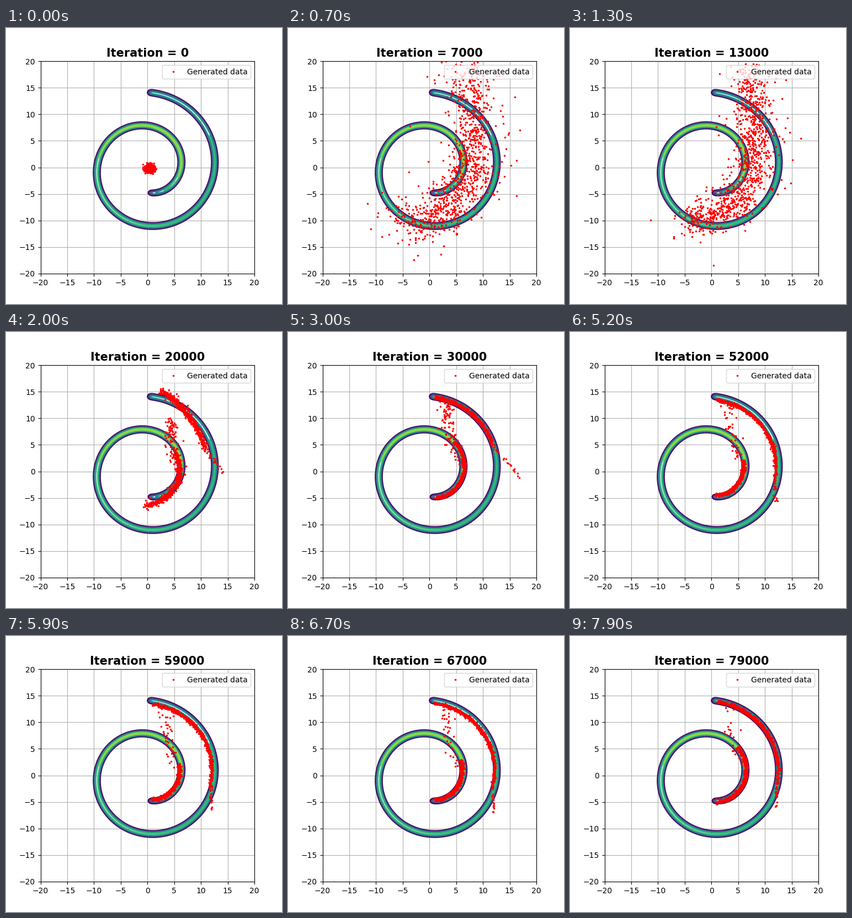
A matplotlib script for the animation above (8000 ms loop, 500 by 500 pixels).

```python
import numpy as np
import matplotlib.pyplot as plt
from matplotlib.animation import FuncAnimation

FRAMES, STEP_MS = 80, 100
N = 1000
PI = np.pi
START = np.array([.4, -.2])
CLOUD = [(6.8, 18.5), (8.3, 8), (8, -1), (3.5, -8), (-5, -10.5)]


def spiral(t, off=0):
    return np.column_stack([(t + off) * np.cos(t), (t + off) * np.sin(t)])


def along(nodes, u):
    """Points at fractions u of a polyline with evenly spaced nodes."""
    x, y = np.transpose(nodes)
    s = np.linspace(0, 1, len(nodes))
    return np.column_stack([np.interp(u, s, x), np.interp(u, s, y)])


def smooth(a, b, x):
    u = np.clip((x - a) / (b - a), 0, 1)
    return u * u * (3 - 2 * u)


def arc(rng, n, lo, hi, off, sd):
    t = PI * (lo + (hi - lo) * np.sort(rng.beta(1.3, 1.15, n))[::-1])
    return spiral(t, off + rng.normal(0, sd, n))


def path(rng, n, nodes, sd):
    return along(nodes, np.sort(rng.random(n)) ** 1.2) + rng.normal(0, sd, (n, 2))


def learned(k, rng):
    """Samples on the two arcs, the bridge between them and the outer tail."""
    age = max(k - 30, 0)
    sway = np.sin(PI * age / 50)
    n_bridge, n_tail = int(105 * np.exp(-age / 33)), 20
    n_in = (N - n_bridge - n_tail) // 2
    n_out = N - n_bridge - n_tail - n_in

    lo = 3.95 + .17 * np.exp(-age / 8)
    off = -.1 - .5 * sway
    tail_from = spiral(np.array([PI * lo]), off)[0]
    tail_to = (12 + 4.8 * np.exp(-age / 4), -7 + 6 * np.exp(-age / 10))
    return np.vstack([
        arc(rng, n_out, lo, 4.48, off, .16),
        path(rng, n_tail, [tail_from, tail_to], .15),
        path(rng, n_bridge, [(3.2, 13), (3.5, 8), (5, 2)], .65),
        arc(rng, n_in, 1.55, 2.28 - .17 * sway, .12 - .5 * sway, .17),
    ])


def samples(k):
    rng = np.random.default_rng(500 + k)
    blob = START + rng.normal(0, .4, (N, 2)) * (1, .85)
    u = np.sort(rng.random(N))
    spread = 2 * k / 7 * np.exp(1 - k / 7)
    cloud = along(CLOUD, u) + spread * rng.standard_t(6, (N, 2))
    grow, settle = smooth(0, 6, k), smooth(12, 24, k)
    pts = (1 - grow) * blob + grow * cloud
    return (1 - settle) * pts + settle * learned(k, rng)


def density(axis, sigma=.33):
    """Gaussian ridge along the spiral, in contour-level units."""
    t = np.linspace(1.5 * PI + .07, 4.5 * PI - .023, 1500)
    height = 6 + .265 * (9.27 - t) - 4.3 * np.exp(-(t - t[0]) / .75)
    ds = np.sqrt(1 + t ** 2) * (t[1] - t[0])
    gx, gy = (np.exp(-(axis[:, None] - c) ** 2 / (2 * sigma ** 2)) for c in spiral(t).T)
    return (gy * height * ds) @ gx.T / (np.sqrt(2 * PI) * sigma)


fig, ax = plt.subplots(figsize=(5, 5), dpi=100)
grid = np.linspace(-20, 20, 500)
ax.contour(grid, grid, density(grid), levels=np.arange(1, 7), cmap="viridis",
           vmin=1, vmax=7, linewidths=1.8)
dots, = ax.plot([], [], "r.", markersize=3, label="Generated data")
ticks = range(-20, 21, 5)
ax.set(xlim=(-20, 20), ylim=(-20, 20), xticks=ticks, yticks=ticks)
ax.grid(True)
ax.legend(loc="upper right")
title = ax.set_title("Iteration = 0", fontsize=15, fontweight="bold")


def update(k):
    dots.set_data(*samples(k).T)
    title.set_text(f"Iteration = {k * 1000}")
    return dots, title


anim = FuncAnimation(fig, update, frames=FRAMES, interval=STEP_MS,
                     repeat=True, repeat_delay=0, blit=False)
plt.show()
```
